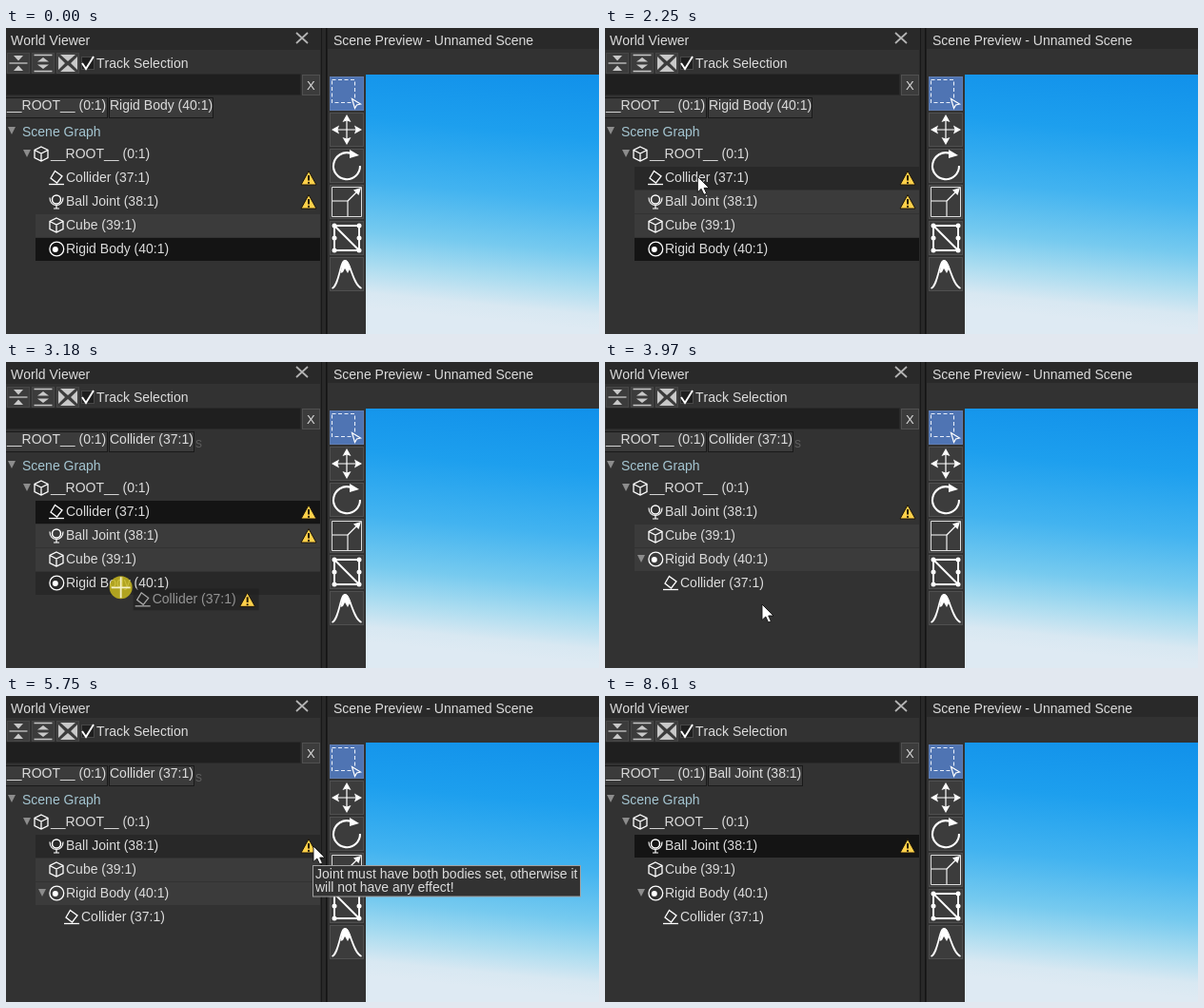
Animation, 623 px wide and 322 px high, one loop 9070 ms. Source, as an HTML page:

```html
<!DOCTYPE html>
<html>
<head>
<meta charset="utf-8">
<style>
html, body { margin: 0; width: 100%; height: 100%; overflow: hidden; background: #323232; }
svg { display: block; width: 623px; height: 322px; }
text { font: 14px "Liberation Sans", Arial, sans-serif; font-kerning: none; fill: #dcdcdc; white-space: pre; }
</style>
</head>
<body>
<svg id="stage" viewBox="0 0 623 322">
  <defs>
    <linearGradient id="sky" gradientUnits="userSpaceOnUse" x1="520" y1="40" x2="494" y2="306">
      <stop offset="0" stop-color="#1191ea"/>
      <stop offset=".25" stop-color="#1d9fee"/>
      <stop offset=".5" stop-color="#42b3f0"/>
      <stop offset=".7" stop-color="#76caef"/>
      <stop offset=".83" stop-color="#aadcf0"/>
      <stop offset=".94" stop-color="#d8e8f2"/>
      <stop offset="1" stop-color="#deeaf3"/>
    </linearGradient>
  </defs>
  <g id="base"></g>
  <g id="live"></g>
</svg>
<script>
const LOOP = 9070;
const base = document.getElementById('base');
const live = document.getElementById('live');

const rect = (x, y, w, h, fill, extra = '') =>
  `<rect x="${x}" y="${y}" width="${w}" height="${h}" fill="${fill}" ${extra}/>`;
const frame = (x, y, w, h, fill, edge) =>
  rect(x + .5, y + .5, w - 1, h - 1, fill, `stroke="${edge}"`);
const label = (x, y, s, extra = '') => `<text x="${x}" y="${y}" ${extra}>${s}</text>`;
const line = (d, w = 1.5, color = '#fff', extra = '') =>
  `<path d="${d}" fill="none" stroke="${color}" stroke-width="${w}" ${extra}/>`;
const shape = (d, fill = '#fff', extra = '') => `<path d="${d}" fill="${fill}" ${extra}/>`;
const dot = (x, y, r, fill = '#fff', extra = '') =>
  `<circle cx="${x}" cy="${y}" r="${r}" fill="${fill}" ${extra}/>`;
const at = (x, y, s, extra = '') => `<g transform="translate(${x} ${y})" ${extra}>${s}</g>`;

// Node icons, centred on 0,0
const icons = {
  collider: line('M-1.5-7L6-1.5L.5 5.5L-6 .5Z', 1.3) + line('M-8 7H8', 1.3),
  joint: dot(0, -2, 4.5, 'none', 'stroke="#fff" stroke-width="1.5"') +
    line('M-7-4C-7 1-4 4 0 4S7 1 7-4M0 4V7.5M-3 7.5H3', 1.2),
  cube: line('M0-7.5L7-4V4L0 7.5L-7 4V-4ZM-7-4L0-.5L7-4M0-.5V7.5', 1.3),
  body: dot(.3, 0, 7.4, 'none', 'stroke="#fff" stroke-width="1.3"') + dot(-1.2, .5, 3)
};
const expander = (x, y) => shape(`M${x - 4} ${y - 4}h8l-4 8z`, '#8c8c8c');
const warning = (x, y) => at(x, y,
  shape('M0-7.5L8 7H-8Z', '#ffd04a', 'stroke="#1c1508" stroke-linejoin="round"') +
  line('M0-3V2.6', 2, '#241a06') + dot(0, 4.9, 1.1, '#241a06'));

const nodes = {
  collider: 'Collider (37:1)',
  joint: 'Ball Joint (38:1)',
  cube: 'Cube (39:1)',
  body: 'Rigid Body (40:1)'
};
const shades = { l: '#3b3b3b', d: '#282828', s: '#141414' };

function drawBase() {
  const tools = [
    line('M-15.5-14.5H8.5V9.5H-15.5Z', 1.1, '#e8eefa', 'stroke-dasharray="4 2.5"') +
      shape('M5.5 5.5L14.5 11L10.5 12L8.5 15.5Z', '#4f74b3', 'stroke="#fff" stroke-width="1.2"'),
    line('M-11 0H11M0-11V11', 1.2) +
      shape('M0-16L4.5-8L0-9.5L-4.5-8ZM0 16L4.5 8L0 9.5L-4.5 8Z' +
        'M-16 0L-8-4.5L-9.5 0L-8 4.5ZM16 0L8-4.5L9.5 0L8 4.5Z'),
    line('M14 0A14 14 0 1 1 4-13.2', 2.1) + shape('M3-17L13-11L3-8Z'),
    line('M-15.5-15.5H15.5V15.5H-15.5Z', 1, '#dcdcdc') +
      line('M-15-1H1V15', 1.1) + line('M1-1L12-12', 1.2) + shape('M15-15L12.5-7L7-12.5Z'),
    line('M-13-13H13V13H-13Z', 1.9) + line('M-13-13L13 13', 1.9) +
      [[-13, -13], [13, -13], [-13, 13], [13, 13], [-13, 0], [13, 0]]
        .map(([x, y]) => dot(x, y, 2.5)).join(''),
    line('M-15.5 15C-8 12-7-14-2-14C4-14 6 11 15.5 15', 1.8) +
      shape('M-6.5-1C-5-9-4-15-2-15C2-15 4-7 5.5-1L3-5L1-1L-2-6L-4-2Z')
  ];
  const grey = '#c8c8c8';
  let s = rect(0, 0, 623, 322, '#323232') + rect(0, 0, 330, 23, '#292929') +
    label(5, 18, 'World Viewer') + line('M305 5L317 16M317 5L305 16', 1.8, '#b4b4b4');
  [13, 39, 65].forEach(x => s += frame(x - 12, 26, 24, 22, '#3c3c3c', '#474747'));
  s += at(13, 37, line('M-9.5 0H9.5', 1.3, grey) + shape('M-5-8H5L0-2.5ZM-5 8H5L0 2.5Z', grey)) +
    at(39, 37, line('M-9.5-8.5H9.5M-9.5 8.5H9.5', 1.3, grey) +
      shape('M-6-1.5H6L0-6ZM-6 1.5H6L0 6Z', grey)) +
    at(65, 37, shape('M-8-9H8L0-2ZM-8 9H8L0 2ZM-10-7L-3 0L-10 7ZM10-7L3 0L10 7Z', grey)) +
    frame(79, 30, 14, 14, '#1e1e1e', '#484848') + line('M80 37L84 43L92 30', 1.9) +
    label(95, 42, 'Track Selection') +
    frame(0, 48, 310, 23, '#1f1f1f', '#292929') +
    frame(311, 49, 19, 22, '#3c3c3c', '#505050') +
    label(316, 65, 'X', 'style="font-size:13px"') +
    label(199, 90, 's', 'style="fill:#5c5c5c"') +
    frame(-2, 73, 109, 22, '#3b3b3b', '#191919') + label(1, 86, '__ROOT__ (0:1)') +
    expander(6, 108) + label(17, 114, 'Scene Graph', 'style="fill:#a5c6d2"') +
    rect(330, 0, 8, 322, '#292929') + rect(331, 0, 1, 322, '#181818') +
    rect(336, 0, 1.5, 322, '#141414') +
    rect(338, 0, 285, 22, '#292929') + label(344, 18, 'Scene Preview - Unnamed Scene') +
    rect(378, 49, 245, 273, 'url(#sky)');
  tools.forEach((icon, i) => {
    const y = 51 + i * 38;
    s += frame(340, y, 36, 36, i ? '#3c3c3c' : '#4f74b3', i ? '#505050' : '#5f7db2') +
      at(358, y + 18, icon);
  });
  base.innerHTML = s;
}

// Pointer moves: start, end, steps, target x, target y
const moves = [
  [150, 530, 6, 319, 162], [760, 760, 1, 317, 155],
  [1560, 1940, 6, 152, 153], [2170, 2320, 3, 70, 158],
  [2490, 2790, 5, 126, 207], [2870, 3030, 3, 140, 246], [3100, 3260, 3, 111, 233],
  [3510, 3590, 2, 110, 235], [3740, 3970, 4, 165, 255],
  [4140, 4820, 10, 259, 177], [4900, 4980, 2, 293, 166], [5050, 5210, 3, 322, 158],
  [5670, 5750, 2, 323, 158], [6680, 7070, 6, 136, 180],
  [7150, 7300, 3, 118, 159], [7380, 7530, 3, 264, 113],
  [7610, 7760, 3, 545, 5], [7910, 8140, 4, 575, 0], [8220, 8610, 6, 612, 345]
];

// Row shades from a time on: root, then the four rows
const rowStates = [
  [0, 'nnnls'], [380, 'nndls'], [530, 'ndlls'],
  [2490, 'nsnll'], [2560, 'nsdll'], [2710, 'nsldl'], [2950, 'nslld'],
  [3030, 'nslll'], [3180, 'nslld'], [3510, 'nnlln'],
  [4440, 'nnldn'], [4670, 'nndln'], [4980, 'ndlln'],
  [6990, 'nndln'], [7150, 'ndlln'], [7300, 'nsnnn'], [7380, 'dsnnn'], [7530, 'nsnnn']
];

function pointer(t) {
  let x = 430, y = 350;
  for (const [start, end, steps, tx, ty] of moves) {
    if (t < start) break;
    const n = steps > 1 ? Math.floor((t - start) / (end - start) * (steps - 1) + .08) + 1 : 1;
    const p = Math.min(1, n / steps);
    x += (tx - x) * p;
    y += (ty - y) * p;
  }
  return [x, y];
}

function tooltip(x, y, w, lines) {
  return frame(x, y, w, lines.length * 13.5 + 6.5, '#323232', '#a0a0a0') +
    lines.map((s, i) => label(x + 3, y + 14 + Math.round(i * 13.5), s)).join('');
}

function rowBar(x, y, shade) {
  return shades[shade] ? rect(x, y - 11, 330 - x, 24, shades[shade]) : '';
}

function drawRow(key, i, shade, nested) {
  const y = 157 + i * 25, dx = nested ? 16 : 0;
  return rowBar(31 + dx, y, shade) +
    at(53 + dx, y + .5, icons[key]) + label(63 + dx, y + 5, nodes[key]);
}

function scene(t) {
  const dropped = t >= 3510;
  const order = dropped ? ['joint', 'cube', 'body', 'collider'] : ['collider', 'joint', 'cube', 'body'];
  const shade = rowStates.filter(r => t >= r[0]).pop()[1];
  const [crumb, width] = t < 2490 ? ['body', 110] : t < 7300 ? ['collider', 90] : ['joint', 100];
  let s = frame(108, 73, width, 22, '#3b3b3b', '#191919') + label(109, 86, nodes[crumb]);

  s += rowBar(17, 132, shade[0]) +
    expander(22, 132) + at(37, 132.5, icons.cube) + label(47, 137, '__ROOT__ (0:1)');
  order.forEach((key, i) => s += drawRow(key, i, shade[i + 1], dropped && i === 3));
  s += warning(318, 158);
  s += dropped ? expander(38, 207) : warning(318, 183);

  if (t >= 530 && t < 1560) s += tooltip(319, 182, 300, [
    '3D Collider must be a direct child of a 3D Rigid',
    'Body node, otherwise it will not have any', ' effect!']);
  if (t >= 5210 && t < 6680) s += tooltip(322, 178, 282, [
    'Joint must have both bodies set, otherwise it', 'will not have any effect!']);

  if (t < 150 || t >= 8610) return s;
  const [x, y] = pointer(t);
  const dragging = t >= 2560 && t < 3510;
  const pressed = dragging || t >= 2490 && t < 2560 || t >= 7300 && t < 7380;
  if (dragging) s += at(x, y,
    rect(13, 1, 132, 23, '#1e1e1e', 'opacity=".6"') +
    at(23, 12.5, icons.collider, 'opacity=".6"') +
    label(33, 17, nodes.collider, 'opacity=".6"') + warning(133, 13));
  if (pressed) s += dot(x, y, 12, '#c8b91e', 'opacity=".85"');
  s += dragging
    ? at(x, y, line('M-10 0H10M0-11V11', 1.8, '#f4f0c8'))
    : at(x, y, shape('M0 0V16.5L3.8 13L6.6 19L9.4 17.8L6.7 12H12Z', '#fff',
        'stroke="#111" stroke-width=".9"'));
  return s;
}

let last = '';
function tick(now) {
  const s = scene(now % LOOP);
  if (s !== last) live.innerHTML = last = s;
  requestAnimationFrame(tick);
}

drawBase();
tick(0);
</script>
</body>
</html>
```
